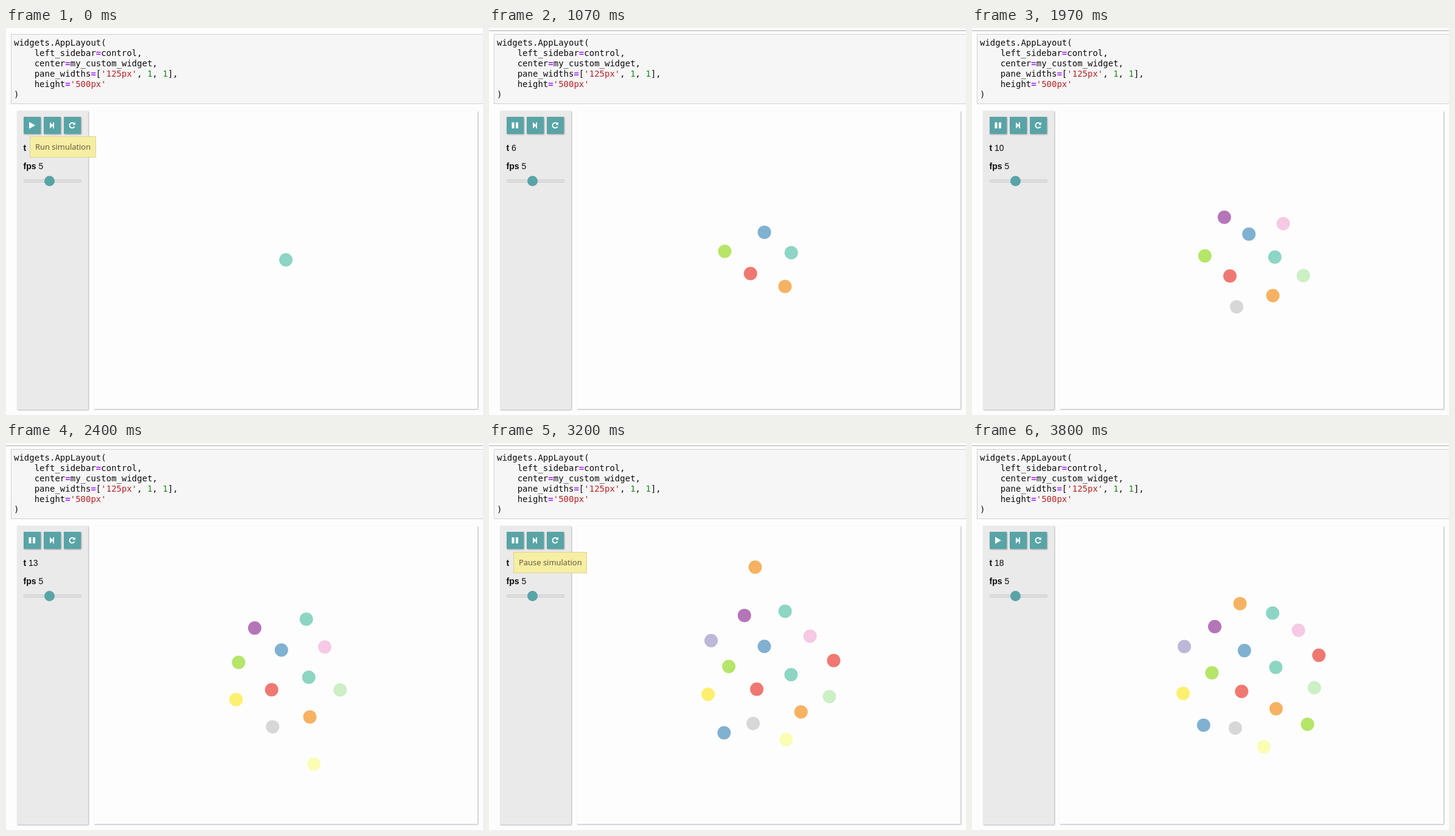
These frames come from a looping animation (784x636 px, 3.83 s). An HTML page:

```html
<!DOCTYPE html>
<html lang="en">
<head>
<meta charset="utf-8">
<title>Simulation widget</title>
<style>
html, body { margin: 0; width: 100%; height: 100%; overflow: hidden; background: #fdfdfd; }
svg { display: block; width: 784px; height: 636px; }
.code { font: 14px "DejaVu Sans Mono", monospace; fill: #0c0c0c; }
.op { font-weight: bold; fill: #a822f8; }
.str { fill: #b82424; }
.num { fill: #188818; }
.label { font: 14px "Liberation Sans", Arial, sans-serif; fill: #0c0c0c; }
.tip { font: 13px "Open Sans", "Noto Sans", sans-serif; fill: #5c503c; }
.b { font-weight: bold; }
.pane { filter: drop-shadow(1px 1.5px 1px rgba(0, 0, 0, .3)); }
.btn { fill: #58a4a6; filter: drop-shadow(1px 1.5px 1px rgba(0, 0, 0, .35)); }
.icon { fill: #fff; }
</style>
</head>
<body>
<svg viewBox="0 0 784 636" xmlns="http://www.w3.org/2000/svg">
  <rect width="784" height="636" fill="#fdfdfd"/>
  <rect id="rule" y="4" width="784" height="1" fill="#ababab"/>
  <rect x="8.5" y="10.5" width="800" height="114" fill="#f6f6f6" stroke="#d0d0d0"/>
  <g class="code">
    <text x="13" y="29">widgets.AppLayout(</text>
    <text x="46.7" y="46">left_sidebar<tspan class="op">=</tspan>control,</text>
    <text x="46.7" y="63">center<tspan class="op">=</tspan>my_custom_widget,</text>
    <text x="46.7" y="80">pane_widths<tspan class="op">=</tspan>[<tspan class="str">'125px'</tspan>, <tspan class="num">1</tspan>, <tspan class="num">1</tspan>],</text>
    <text x="46.7" y="97">height<tspan class="op">=</tspan><tspan class="str">'500px'</tspan></text>
    <text x="13" y="114">)</text>
  </g>

  <rect class="pane" x="18" y="136" width="117" height="491" fill="#ebeaeb"/>
  <rect class="pane" x="144" y="136" width="631" height="490" fill="#fdfdfd"/>
  <g id="dots"></g>

  <rect class="btn" x="29" y="146" width="28" height="28"/>
  <rect class="btn" x="62" y="146" width="28" height="28"/>
  <rect class="btn" x="95" y="146" width="28" height="28"/>
  <path id="play" class="icon" d="M38 154.3 48 160 38 165.7Z"/>
  <path id="pause" class="icon" d="M37.5 155h4v10h-4zM44 155h4v10h-4z"/>
  <path class="icon" d="M72 154.7 77 159.3V155h2v10h-2v-4.3L72 165.3Z"/>
  <path d="M112.2 157.4A4.3 4.3 0 1 0 112.6 162" fill="none" stroke="#fff" stroke-width="1.9"/>
  <path class="icon" d="M114 154.6v4.7h-4.7z"/>

  <text class="label b" x="28.5" y="202">t</text>
  <text class="label" id="count" x="37" y="202"></text>
  <text class="label" x="28.5" y="232"><tspan class="b">fps</tspan> 5</text>
  <rect x="29.5" y="249.5" width="94" height="4" rx="1" fill="#e0e0e0" stroke="#cacaca"/>
  <circle cx="71.5" cy="251.5" r="8.5" fill="#58a4a6"/>

  <g id="tip">
    <rect id="tipBox" x="39.5" y="178.5" height="34" fill="#f6eea2" stroke="#dcd498"/>
    <text id="tipText" class="tip" x="48" y="200"></text>
  </g>
</svg>
<script>
const LOOP = 3830, FRAME = 100 / 3, TICK = 50 / 3;
const SCALE = 4.9, CX = 460, CY = 381;
const CHARGE = -5, PULL = 0.1, THETA2 = 0.81;
const ALPHA_DECAY = 1 - Math.pow(0.001, 1 / 300);
const COLORS = ['#8dd5c4', '#fbfdb3', '#bdb7d8', '#f07872', '#80b1d1', '#f6b262',
  '#b5e569', '#f6c9e4', '#d7d7d7', '#b575b9', '#ccefc5', '#fdf06f'];
const FIRST = 3, LAST = 18;
const PAUSED = 3440;

const $ = id => document.getElementById(id);
const stepTime = n => n < 4 ? 30 + 200 * (n - 1) : 575 + 200 * (n - 4);

// Smallest doubling square that holds all nodes
function bounds(nodes) {
  const xs = nodes.map(n => n.x), ys = nodes.map(n => n.y);
  const x = Math.floor(Math.min(...xs)), y = Math.floor(Math.min(...ys));
  let size = 1;
  while (Math.max(...xs) >= x + size || Math.max(...ys) >= y + size) size *= 2;
  return { x, y, size };
}

function quad(nodes, x, y, size) {
  const q = { nodes, size, kids: [] };
  q.x = nodes.reduce((s, n) => s + n.x, 0) / nodes.length;
  q.y = nodes.reduce((s, n) => s + n.y, 0) / nodes.length;
  if (nodes.length > 1 && size > 1e-6) {
    const h = size / 2;
    for (let i = 0; i < 4; i++) {
      const right = i & 1, low = i >> 1;
      const part = nodes.filter(n => (n.x >= x + h) == right && (n.y >= y + h) == low);
      if (part.length) q.kids.push(quad(part, x + right * h, y + low * h, h));
    }
  }
  return q;
}

function repel(node, q, alpha) {
  const dx = q.x - node.x, dy = q.y - node.y;
  let d2 = dx * dx + dy * dy;
  const far = q.size * q.size / THETA2 < d2;
  if (!far && q.kids.length) return q.kids.forEach(k => repel(node, k, alpha));
  if (!d2) return;
  if (d2 < 1) d2 = Math.sqrt(d2);
  const f = CHARGE * q.nodes.length * alpha / d2;
  node.vx += dx * f;
  node.vy += dy * f;
}

function tick(nodes, alpha) {
  const b = bounds(nodes), root = quad(nodes, b.x, b.y, b.size);
  for (const n of nodes) {
    repel(n, root, alpha);
    n.vx -= n.x * PULL * alpha;
    n.vy -= n.y * PULL * alpha;
  }
  for (const n of nodes) {
    n.x += n.vx *= 0.6;
    n.y += n.vy *= 0.6;
  }
}

// Run the whole simulation once and keep every tick
function simulate() {
  const nodes = [{ x: 0, y: 0, vx: 0, vy: 0 }];
  const shots = [];
  const save = time => shots.push({ time, at: nodes.map(n => [n.x, n.y]) });
  save(0);
  for (let id = FIRST; id <= LAST; id++) {
    const i = nodes.length, r = 10 * Math.sqrt(0.5 + i), a = i * Math.PI * (3 - Math.sqrt(5));
    nodes.push({ x: r * Math.cos(a), y: r * Math.sin(a), vx: 0, vy: 0 });
    const end = id < LAST ? stepTime(id + 1) : LOOP;
    let alpha = 1;
    for (let time = stepTime(id); time < end; time += TICK) {
      alpha -= alpha * ALPHA_DECAY;
      tick(nodes, alpha);
      save(time);
    }
  }
  return shots;
}

const shots = simulate();
const dots = shots[shots.length - 1].at.map((_, i) => {
  const c = document.createElementNS('http://www.w3.org/2000/svg', 'circle');
  c.setAttribute('r', 11);
  c.setAttribute('fill', COLORS[(i ? i + FIRST - 1 : 0) % COLORS.length]);
  return $('dots').appendChild(c);
});

const show = (id, on) => $(id).setAttribute('visibility', on ? 'visible' : 'hidden');

function tooltip(text, width, shift) {
  show('tip', text);
  show('count', !text);
  $('tipText').textContent = text;
  $('tipBox').setAttribute('width', width);
  $('tip').setAttribute('transform', `translate(${shift} ${shift})`);
}

function draw(ms) {
  const t = Math.floor((ms + 3.4) / FRAME) * FRAME;
  let shot = shots[0];
  for (const s of shots) if (s.time <= t) shot = s;
  dots.forEach((c, i) => {
    const p = shot.at[i];
    c.setAttribute('visibility', p ? 'visible' : 'hidden');
    if (!p) return;
    c.setAttribute('cx', (CX + p[0] * SCALE).toFixed(2));
    c.setAttribute('cy', (CY + p[1] * SCALE).toFixed(2));
  });

  let count = 0;
  while (count < LAST && stepTime(count + 1) <= t) count++;
  $('count').textContent = count;

  const running = t >= 30 && t < PAUSED;
  show('play', !running);
  show('pause', running);
  show('rule', t >= 30);
  if (t < 30) tooltip('Run simulation', 108, 0);
  else if (t >= 3100 && t < PAUSED) tooltip('Pause simulation', 120, 1);
  else tooltip('', 0, 0);
}

const start = performance.now();
function loop() {
  draw((performance.now() - start) % LOOP);
  requestAnimationFrame(loop);
}
draw(0);
requestAnimationFrame(loop);
</script>
</body>
</html>
```
